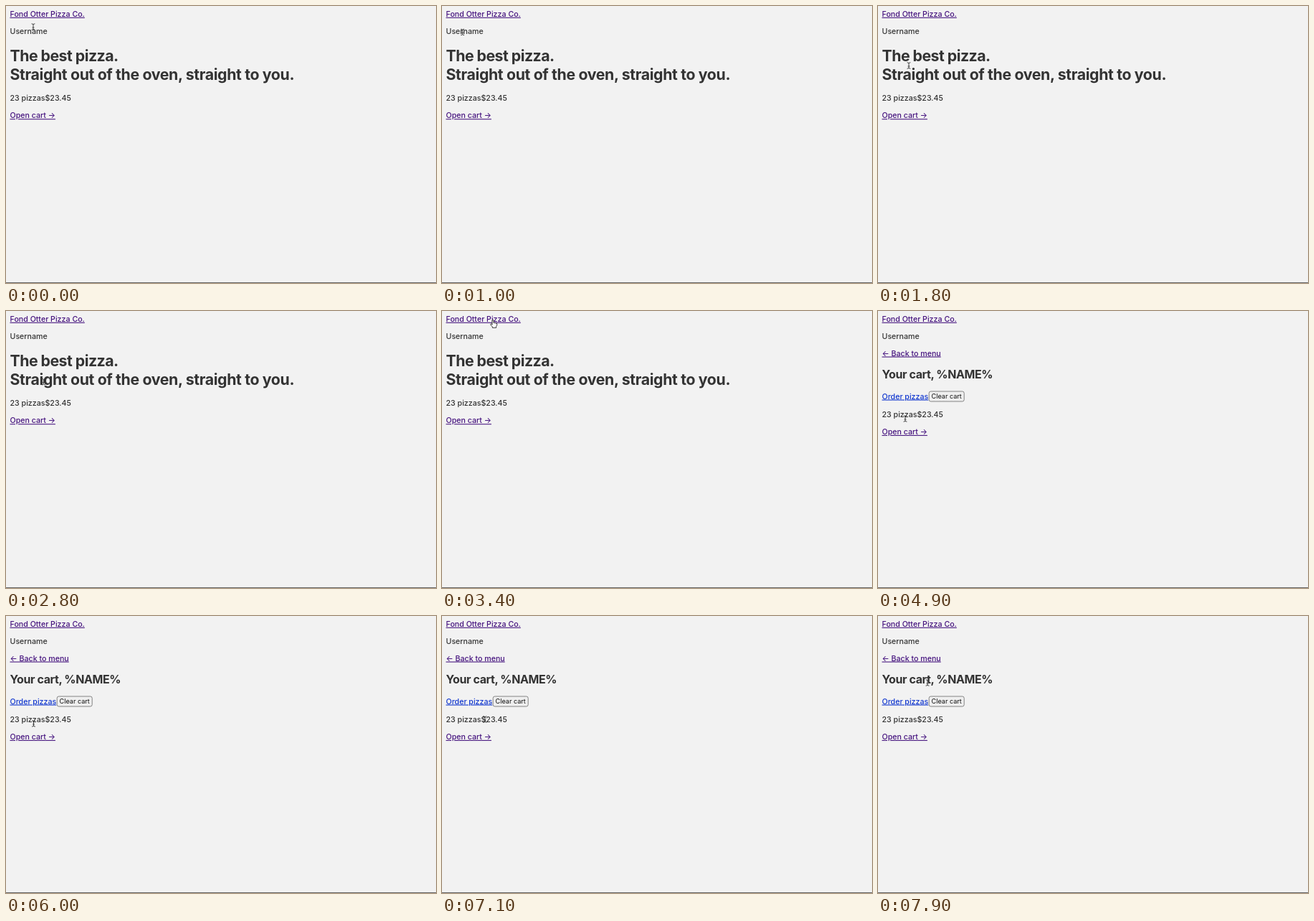
An HTML page for the animation above (8000 ms loop, 600 by 386 pixels).

```html
<!DOCTYPE html>
<html lang="en">
<head>
<meta charset="utf-8">
<title>Pizza shop</title>
<style>
  html, body { margin: 0; width: 100%; height: 100%; overflow: hidden; background: #f2f2f2; }
  svg { display: block; width: 600px; height: 386px; }
  text { font: 500 10.65px Inter, "Noto Sans", sans-serif; fill: #333; white-space: pre; }
  .h1 { font-size: 21.3px; font-weight: 700; letter-spacing: -.025em; }
  .long { letter-spacing: -.0175em; }
  .h2 { font-size: 16px; font-weight: 700; letter-spacing: -.025em; }
  .link { fill: #46147f; text-decoration: underline; text-decoration-thickness: 1px; text-underline-offset: 2.6px; }
  .fresh { fill: #1238cf; }
  .button { font-size: 9.1px; font-weight: 400; fill: #111; }
  .hidden { display: none; }
</style>
</head>
<body>
<svg viewBox="0 0 600 386">
  <rect width="600" height="386" fill="#f2f2f2"/>
  <rect y="385" width="600" height="1" fill="#666"/>
  <text class="link" x="5.5" y="14.8">Fond Otter Pizza Co.</text>
  <text x="5.5" y="38.8">Username</text>

  <g id="home">
    <text class="h1" x="5.5" y="76.6">The best pizza.</text>
    <text class="h1 long" x="5.5" y="102.6">Straight out of the oven, straight to you.</text>
  </g>

  <g id="cart" class="hidden">
    <text class="link" x="5.5" y="62.5">← Back to menu</text>
    <text class="h2" x="5.5" y="94.4">Your cart, %NAME%</text>
    <text class="link fresh" x="5.5" y="122.5">Order pizzas</text>
    <rect x="71.2" y="112" width="49" height="14" rx="2.5" fill="#efefef" stroke="#777" stroke-width=".9"/>
    <text class="button" x="74.6" y="122.3">Clear cart</text>
  </g>

  <g id="summary">
    <text x="5.5" y="132.3">23 pizzas$23.45</text>
    <text class="link" x="5.5" y="156.2">Open cart →</text>
  </g>

  <g id="cursor" stroke-linejoin="round" stroke-linecap="round">
    <path id="beam" fill="none" stroke="#333" stroke-width=".9"
      d="M-2-4.2Q0-4.2 0-3Q0-4.2 2-4.2M0-3V3M-2 4.2Q0 4.2 0 3Q0 4.2 2 4.2M-1 1H1"/>
    <path id="arrow" fill="#111" stroke="#fff" stroke-width=".8"
      d="M0 0V9.4L2.2 7.4L3.7 10.8L5.4 10L3.9 6.8H6.8Z"/>
    <path id="hand" fill="#fff" stroke="#222" stroke-width=".9"
      d="M-1 6V1Q0-.8 1 1V4.5Q2 3.6 2.8 4.8Q3.8 4 4.5 5.2Q5.8 4.8 5.8 6.4Q5.8 8.5 4.6 9.6V11.3H-.6V10Q-2.2 8.6-3.4 6.6Q-3 5.2-1 6.8Z"/>
  </g>
</svg>
<script>
  const LOOP = 8000, STEP = 100, OPEN_CART = 4900;
  const byId = id => document.getElementById(id);
  const showOnly = (shown, ids) =>
    ids.forEach(id => byId(id).classList.toggle("hidden", id !== shown));

  const texts = [...document.querySelectorAll("text:not(.button)")];
  const start = { x: 38, y: 29 };
  const moves = [
    { from: 0, to: 400, x: 27, y: 31 },
    { from: 800, to: 1800, x: 43, y: 83 },
    { from: 1800, to: 2200, x: 46, y: 129 },
    { from: 2500, to: 3400, x: 71, y: 12 },
    { from: 3400, to: 4300, x: 38, y: 150 },
    { from: 5900, to: 7000, x: 60, y: 144 },
    { from: 7100, to: 7900, x: 69, y: 93 }
  ];

  function pointerAt(t) {
    return moves.reduce((at, move) => {
      const u = Math.min(1, Math.max(0, (t - move.from) / (move.to - move.from)));
      const ease = u * u * (3 - 2 * u);
      return { x: at.x + (move.x - at.x) * ease, y: at.y + (move.y - at.y) * ease };
    }, start);
  }

  // Plain text reacts across its whole row, a link only over its own width.
  function shapeAt({ x, y }) {
    const hit = texts.find(text => {
      const box = text.getBoundingClientRect();
      const isLink = text.classList.contains("link");
      return y > box.top && y < box.bottom && (!isLink || x < box.right);
    });
    if (!hit) return "arrow";
    return hit.classList.contains("link") ? "hand" : "beam";
  }

  function draw(now) {
    const t = Math.floor((now % LOOP) / STEP) * STEP;
    const page = t < OPEN_CART ? "home" : "cart";
    showOnly(page, ["home", "cart"]);
    byId("summary").setAttribute("transform", `translate(0 ${page === "cart" ? 15.7 : 0})`);

    const pointer = pointerAt(t);
    showOnly(shapeAt(pointer), ["beam", "arrow", "hand"]);
    byId("cursor").setAttribute("transform", `translate(${pointer.x} ${pointer.y})`);
  }

  function frame() {
    draw(performance.now());
    requestAnimationFrame(frame);
  }
  frame();
</script>
</body>
</html>
```
